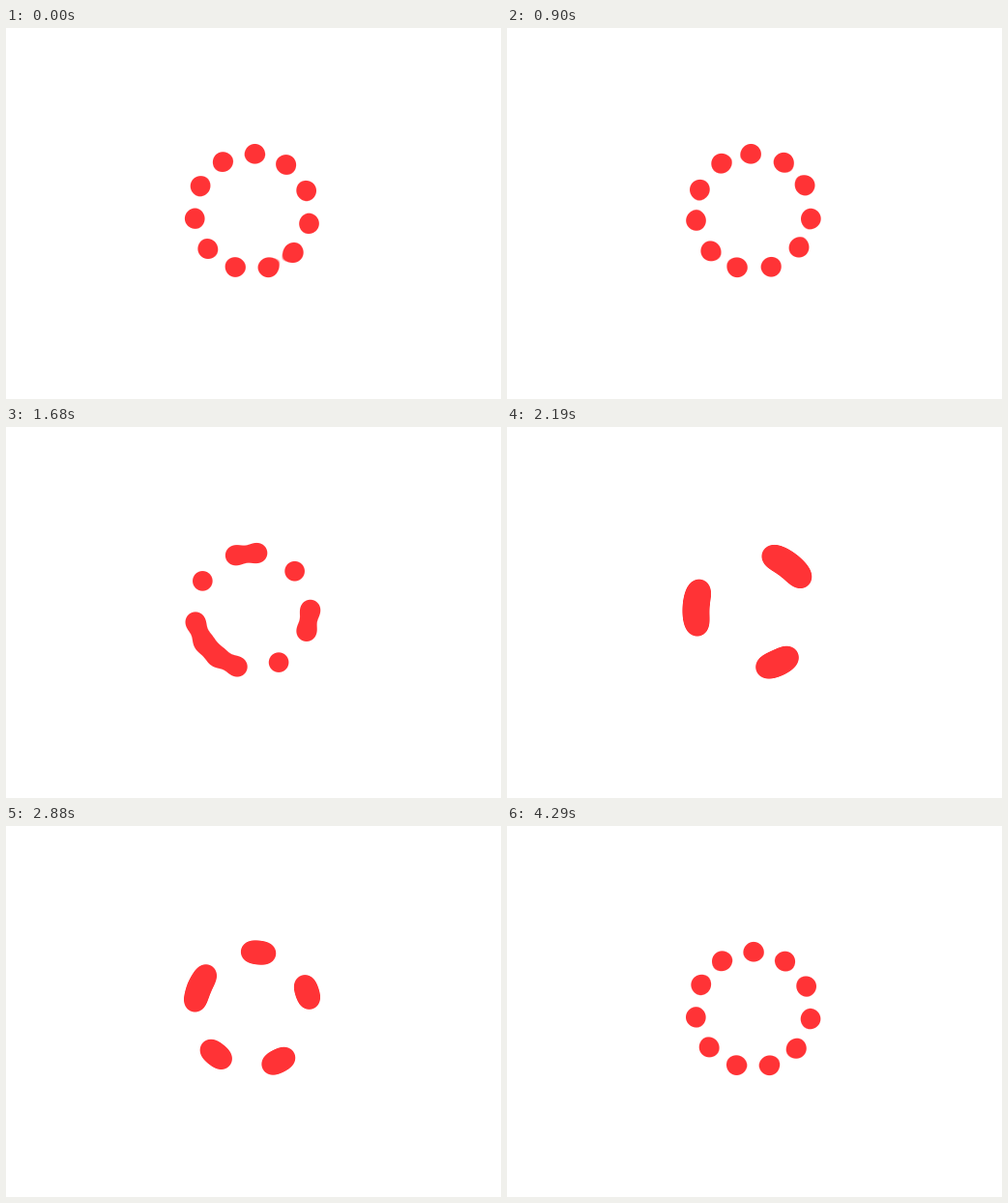
Write an HTML page with a canvas that moves like this. It is 512 px wide and 384 px high and loops after 4320 ms.

```html
<!DOCTYPE html>
<html lang="en">
<head>
<meta charset="utf-8">
<title>Gooey ring</title>
<style>
  html, body { margin: 0; width: 100%; height: 100%; overflow: hidden; background: #fff; }
  canvas { display: block; }
</style>
</head>
<body>
<canvas id="stage" width="512" height="384"></canvas>
<script>
const LOOP = 4320, STEP = 30;
const DOTS = 11, RING = 60, CX = 254.8, CY = 190.2;
const RADIUS = 10.3, SPREAD = 158;       // dot radius and falloff of its field
const EDGE = 2 * RADIUS / SPREAD;        // field slope at a dot's rim, per pixel
const LEFT = 155, TOP = 90, SIZE = 200;  // area that is repainted
const COLOR = [255, 51, 54];

// time, gap between neighbouring dots in 1/11 turns, speed per second
const KEYS = [
  [0, 1.011, 0.35],
  [900, 1.992, 1.38],
  [1680, 3.239, 1.35],
  [2190, 3.79, 1.05],
  [2880, 4.49, 1.1],
  [3540, 5.31, 1.15],
  [4290, 6.003, 0.2]
];

const ctx = document.getElementById('stage').getContext('2d');
const image = ctx.createImageData(SIZE, SIZE);
const field = new Float32Array(SIZE * SIZE);
const column = new Float32Array(SIZE);

for (let i = 0; i < field.length; i++) image.data.set(COLOR, i * 4);

// Cubic Hermite through KEYS
function gapAt(t) {
  let i = 0;
  while (i < KEYS.length - 2 && t >= KEYS[i + 1][0]) i++;
  const [t0, a, va] = KEYS[i], [t1, b, vb] = KEYS[i + 1];
  const span = (t1 - t0) / 1000;
  const u = (t - t0) / (t1 - t0), w = 1 - u;
  return w * w * (1 + 2 * u) * a + u * u * (3 - 2 * u) * b
    + u * w * span * (w * va - u * vb);
}

const falloff = d => Math.exp(-d * d / SPREAD);

function addDot(x, y) {
  for (let i = 0; i < SIZE; i++) column[i] = falloff(LEFT + i + 0.5 - x);
  for (let j = 0, p = 0; j < SIZE; j++) {
    const row = falloff(TOP + j + 0.5 - y);
    for (let i = 0; i < SIZE; i++) field[p++] += row * column[i];
  }
}

function draw(t) {
  const gap = gapAt(t);
  field.fill(0);
  for (let n = 1; n <= DOTS; n++) {
    const angle = (4 + n * gap) / DOTS * 2 * Math.PI;
    addDot(CX + RING * Math.sin(angle), CY - RING * Math.cos(angle));
  }
  const rim = falloff(RADIUS);
  for (let p = 0; p < field.length; p++) {
    const inside = Math.log(field[p] / rim) / EDGE + 0.5;
    image.data[p * 4 + 3] = 255 * Math.max(0, Math.min(1, inside));
  }
  ctx.putImageData(image, LEFT, TOP);
}

const start = performance.now();
function tick() {
  const t = (performance.now() - start) % LOOP;
  draw(Math.floor(t / STEP) * STEP);
  requestAnimationFrame(tick);
}
tick();
</script>
</body>
</html>
```
